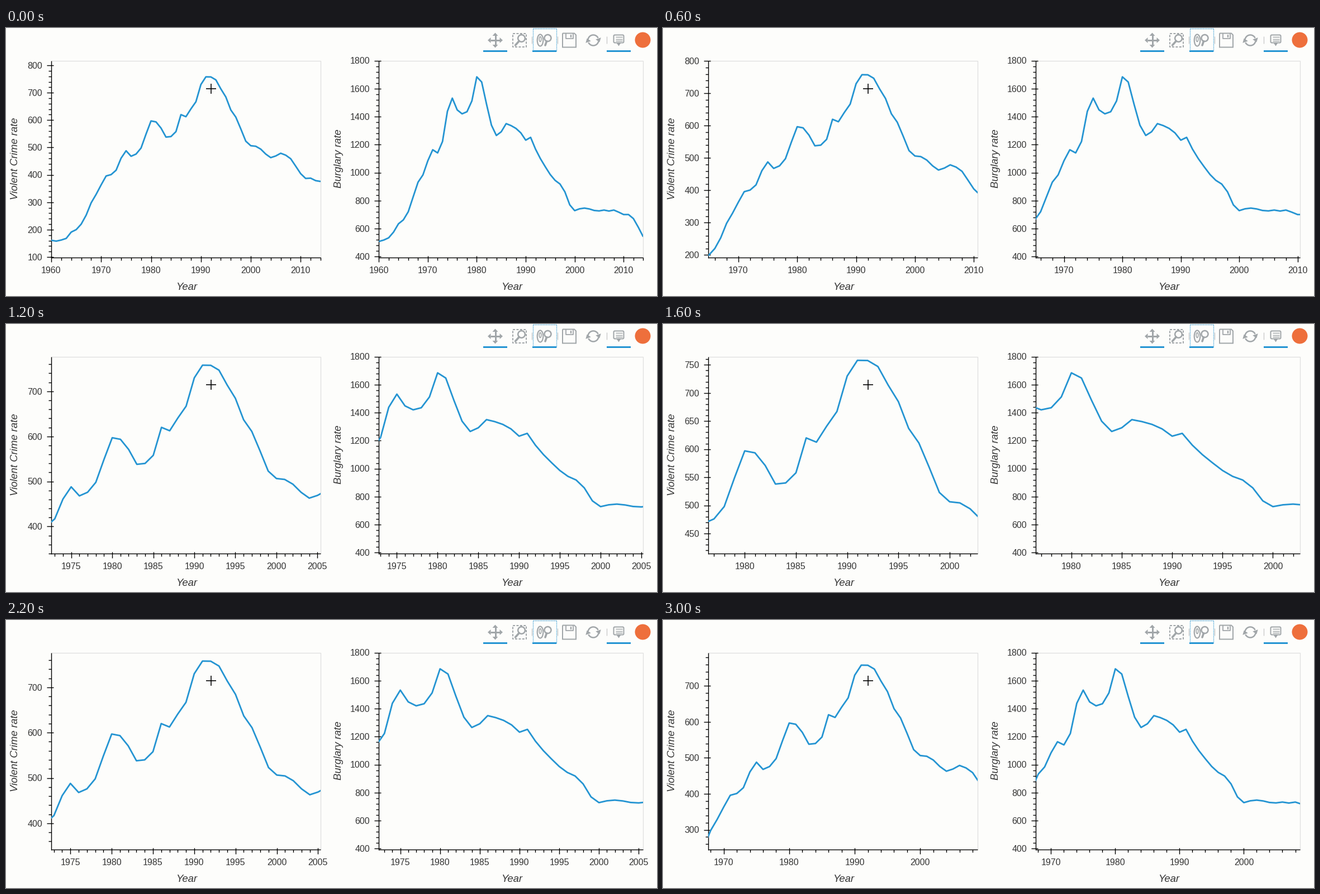
Animation of 1165 by 481 pixels, one loop 3200 ms. Source, as a matplotlib script:

```python
import math

import numpy as np
import matplotlib.pyplot as plt
from matplotlib.animation import FuncAnimation
from matplotlib.patches import Circle, Ellipse, FancyBboxPatch, Polygon, Rectangle

W, H, DPI = 1165, 481, 64
PT = 72 / DPI  # points per pixel
TOP, BOTTOM = 58.5, 412
BG, BLUE, GREY, INK = "#fdfdfb", "#2494d2", "#a1a6a9", "#343434"

VIOLENT = [
    161, 158, 162, 168, 191, 200, 220, 253, 298, 329,
    363.5, 396, 401, 417, 461, 488, 468, 476, 498, 549,
    597, 593.5, 571, 538, 540, 558, 620, 612.5, 641, 667,
    730, 758, 757.7, 747, 714, 684.5, 637, 611, 568, 523,
    506.5, 504.5, 494, 476, 463, 469, 479, 472, 459, 432,
    404.5, 387, 388, 379, 376]
BURGLARY = [
    509, 519, 535, 576, 635, 663, 721, 827, 932, 984,
    1085, 1163.5, 1141, 1222.5, 1438, 1532, 1448, 1420, 1435, 1512,
    1684, 1647, 1488, 1339, 1265.5, 1292, 1350, 1336, 1316, 1284,
    1232, 1252, 1168, 1100, 1042, 987, 945, 919, 863, 770,
    729, 742, 747, 741, 730, 727, 733, 726, 733, 718,
    701, 701, 672, 610.5, 542.5]
YEARS = np.arange(1960, 2015)

# Wheel zoom about the pointer: in at a steady rate, then back out
FOCUS_X, FOCUS_Y = 1992.04, 714.6
ZOOM = [1, 1, 1.056, 1.18, 1.32, 1.474, 1.646, 1.842,
        2.054, 2.1, 1.93, 1.655, 1.365, 1.347, 1.322, 1.313]
LEAD = 0.1  # the linked panel is slightly ahead

plt.rcParams["font.family"] = "Liberation Sans"
fig = plt.figure(figsize=(W / DPI, H / DPI), dpi=DPI, facecolor=BG)
ax = fig.add_axes([0, 0, 1, 1])
ax.set(xlim=(0, W), ylim=(H, 0))
ax.axis("off")


def line(xs, ys, color="black", w=1.4, z=2, **kw):
    kw.setdefault("solid_capstyle", "butt")
    return ax.plot(xs, ys, color=color, lw=w * PT, zorder=z, **kw)[0]


def text(x, y, s, size=16, **kw):
    return ax.text(x, y, s, fontsize=size * PT, color=INK,
                   va="baseline", rotation_mode="anchor", **kw)


def shape(patch, fill="none", edge="none", w=0, z=2):
    patch.set(facecolor=fill, edgecolor=edge, linewidth=w * PT, zorder=z)
    return ax.add_patch(patch)


def nice_step(span):
    base = 10 ** math.floor(math.log10(span / 6))
    return min((base * m for m in (1, 2, 5, 10)), key=lambda s: abs(6 - span / s))


def ticks(lo, hi):
    """Yield (value, is_major) for every tick in the range."""
    step = nice_step(hi - lo)
    minor = step / 5
    for i in range(math.ceil(lo / minor - 1e-6), math.floor(hi / minor + 1e-6) + 1):
        yield i * minor, i % 5 == 0


class Panel:
    def __init__(self, left, right, values, title, title_x):
        self.left, self.right = left, right
        self.values = np.array(values)
        mid = (left + right) / 2
        line([left, right, right], [TOP, TOP, BOTTOM], "#e0e0e0", 1.3, z=1)
        line([left, left], [TOP, BOTTOM + 0.5])
        line([left, right], [BOTTOM, BOTTOM])
        text(mid + 1, 469.5, "Year", 18.5, ha="center", style="italic")
        text(title_x, 234, title, 18.5, ha="center", style="italic", rotation=90)
        self.curve = line([], [], BLUE, 2.8, z=3, solid_joinstyle="round")
        self.curve.set_clip_path(Rectangle((left, TOP), right - left, BOTTOM - TOP,
                                           transform=ax.transData))
        self.marks = []

    def draw(self, x_lim, y_lim):
        for mark in self.marks:
            mark.remove()
        self.marks = []

        def px(v):
            return self.left + (v - x_lim[0]) / (x_lim[1] - x_lim[0]) * (self.right - self.left)

        def py(v):
            return BOTTOM - (v - y_lim[0]) / (y_lim[1] - y_lim[0]) * (BOTTOM - TOP)

        self.curve.set_data(px(YEARS), py(self.values))
        for v, major in ticks(*x_lim):
            x = px(v)
            a, b = (-3.5, 8) if major else (0, 5)
            self.marks.append(line([x, x], [BOTTOM + a, BOTTOM + b]))
            if major:
                self.marks.append(text(x, 440, f"{v:.0f}", ha="center"))
        for v, major in ticks(*y_lim):
            y = py(v)
            a, b = (-8, 3.5) if major else (-5, 0)
            self.marks.append(line([self.left + a, self.left + b], [y, y]))
            if major:
                self.marks.append(text(self.left - 16, y + 5.8, f"{v:.0f}", ha="right"))


def lens(x, y, r, hx, hy):
    d = math.hypot(hx - x, hy - y)
    line([x + (hx - x) * r / d, hx], [y + (hy - y) * r / d, hy], GREY, 3.6,
         solid_capstyle="round")
    shape(Circle((x, y), r), edge=GREY, w=2.5)


def pan_icon(x, y):
    line([x - 9, x + 9], [y, y], GREY, 3)
    line([x, x], [y - 9, y + 9], GREY, 3)
    for dx, dy in ((1, 0), (-1, 0), (0, 1), (0, -1)):
        tip = (x + 13.5 * dx, y + 13.5 * dy)
        bx, by = x + 8 * dx, y + 8 * dy
        shape(Polygon([tip, (bx + 5 * dy, by + 5 * dx), (bx - 5 * dy, by - 5 * dx)]), GREY)


def reset_icon(x, y, r=9.5):
    for start in (190, 10):
        t = np.radians(np.linspace(start, start + 145, 30))
        line(x + r * np.cos(t), y + r * np.sin(t), GREY, 2.5)
        end = t[-1] + 0.1
        c, s = math.cos(end), math.sin(end)
        shape(Polygon([(x + (r - 5) * c, y + (r - 5) * s),
                       (x + (r + 5) * c, y + (r + 5) * s),
                       (x + r * c - 7 * s, y + r * s + 7 * c)]), GREY)


def save_icon(x, y):
    line([x, x + 21, x + 24, x + 24, x, x], [y, y, y + 3, y + 25, y + 25, y], GREY, 2,
         solid_joinstyle="miter")
    line([x + 6, x + 6, x + 19, x + 19], [y, y + 9, y + 9, y], GREY, 1.8)
    line([x + 15, x + 15], [y + 2, y + 7], GREY, 2.4)


def hover_icon(x, y):
    shape(FancyBboxPatch((x - 9, y - 9), 18, 14, boxstyle="round,pad=0,rounding_size=2"),
          edge=GREY, w=2)
    shape(Polygon([(x - 4, y + 5), (x + 4, y + 5), (x, y + 11)]), GREY)
    for dy in (-5.5, -2, 1.5):
        line([x - 6, x + 6], [y + dy, y + dy], GREY, 1.4)


def toolbar():
    pan_icon(875.5, 22)
    line([907, 931, 931, 907, 907], [10, 10, 34, 34, 10], GREY, 2, ls=(0, (2, 1.2)))
    lens(922.5, 18.5, 6.3, 911.5, 31)
    shape(Ellipse((956, 22), 10.5, 21), edge=GREY, w=2.2)
    shape(Ellipse((956, 20), 3.6, 9), edge=GREY, w=1.6)
    lens(969.5, 18, 6, 965, 31)
    save_icon(996, 9.5)
    reset_icon(1051, 22)
    hover_icon(1096.5, 21.5)
    for x in (941, 986.5, 1074.5):
        line([x, x], [15, 28], "#c4c4c4", 1.2)
    line([942.5, 984.5, 984.5, 942.5, 942.5], [0.5, 0.5, 41, 41, 0.5], BLUE, 1.2,
         ls=(0, (1.2, 1.2)))
    for x in (854, 942, 1075):
        shape(Rectangle((x, 40), 43, 3), BLUE)
    shape(Circle((1139.5, 21.5), 14), "#ee6f3c")


toolbar()
left = Panel(81, 563, VIOLENT, "Violent Crime rate", 21.5)
right = Panel(667.3, 1140.3, BURGLARY, "Burglary rate", 600)

line([358, 376], [109, 109], "white", 3.2, z=5)
line([367, 367], [100, 118], "white", 3.2, z=5)
line([358, 376], [109, 109], w=1.6, z=6)
line([367, 367], [100, 118], w=1.6, z=6)


def zoomed(lo, hi, focus, scale):
    return focus + (lo - focus) / scale, focus + (hi - focus) / scale


def draw(i):
    here = ZOOM[i]
    ahead = math.exp(np.interp(i + LEAD * (i > 1), range(len(ZOOM)), np.log(ZOOM)))
    left.draw(zoomed(1960, 2014, FOCUS_X, here), zoomed(98, 817.4, FOCUS_Y, here))
    right.draw(zoomed(1960, 2014, FOCUS_X, ahead), (394, 1800))
    return []


anim = FuncAnimation(fig, draw, frames=len(ZOOM), interval=200, repeat=True, repeat_delay=0)
plt.show()
```
